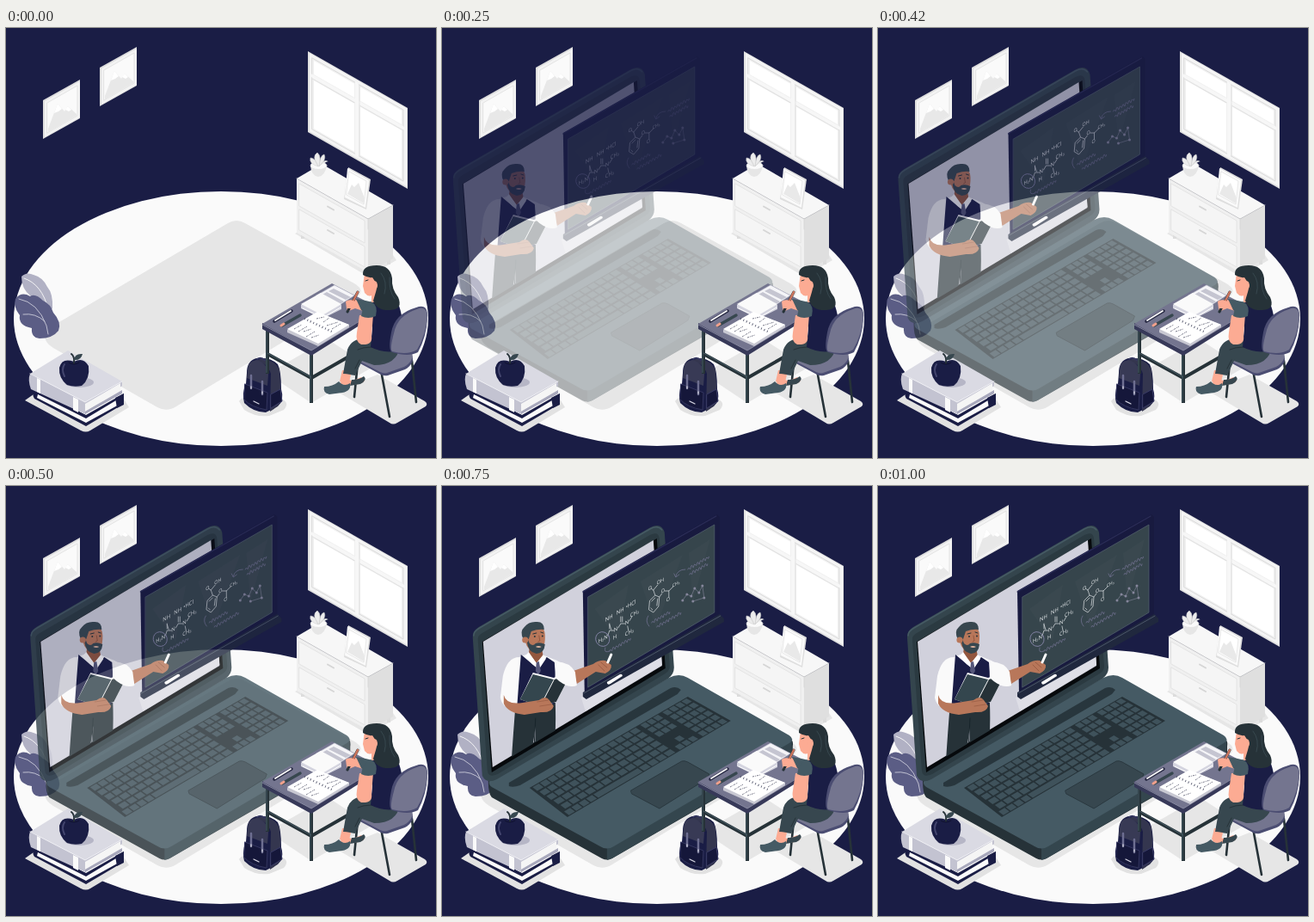
Write an HTML page that moves like this. It is 500x500 px and loops after 1.04 s.

```html
<!DOCTYPE html>
<html lang="en">
<head>
<meta charset="utf-8">
<title>Online lesson</title>
<style>
  html, body { margin: 0; width: 100%; height: 100%; overflow: hidden; background: #1a1d45; }
  svg { display: block; width: 100%; height: 100%; }
  text { font-family: "Open Sans", Arial, sans-serif; }
</style>
</head>
<body>
<svg viewBox="0 0 500 500" fill="none" stroke-linecap="round" stroke-linejoin="round">
  <defs>
    <g id="picture">
      <path d="M43 84 86 60V105L43 129Z" fill="#dedede"/>
      <path d="M45 85 86 62V104L45 127Z" fill="#f3f3f3"/>
      <path d="M48 87 83 67V102L48 122Z" fill="#fafafa" stroke="#dcdcdc" stroke-width=".7"/>
      <path d="M49 117 60 88 68 97 72 91 82 100V102L49 121Z" fill="#e8e8e8"/>
      <path d="M56 99 60 88 65 94 61 97ZM69 95 72 91 76 95 73 97Z" fill="#fff"/>
    </g>
    <clipPath id="screenClip"><path d="M46 181 244 63 254 210 57 328Z"/></clipPath>
  </defs>

  <rect width="500" height="500" fill="#1a1d45"/>
  <ellipse cx="250" cy="338" rx="241" ry="148" fill="#fafafa"/>
  <path d="M258 227Q268 221 278 227L405 297Q420 306 405 315L198 440Q187 447 176 441L55 372Q36 360 55 346Z" fill="#e6e6e6"/>
  <path d="M384 422 446 459Q450 462 455 459L488 440Q491 437 487 434L432 403Z" fill="#e6e6e6"/>
  <path d="M304 402 355 436 425 395 374 362Z" fill="#e6e6e6"/>
  <use href="#picture"/>
  <use href="#picture" x="66" y="-38"/>

  <g id="window" transform="matrix(1 .569 0 1 351 27)">
    <path d="M0 0H116V94H0Z" fill="#e0e0e0"/>
    <path d="M2 1H115V92H2Z" fill="#f5f5f5"/>
    <path d="M5 5H111V88H5Z" fill="#f0f0f0" stroke="#d5d5d5" stroke-width=".7"/>
    <path d="M7 7H54V23H7ZM61 7H109V23H61ZM7 30H54V86H7ZM61 30H109V86H61Z" fill="#fff"/>
    <path d="M5 26H54M61 26H111M57 5V88" stroke="#f7f7f7" stroke-width="4"/>
    <path d="M5 29H54M61 29H111M60 5V88" stroke="#dedede" stroke-width=".8"/>
  </g>

  <g id="dresser">
    <path d="M336 239 342 236 421 280 450 264 454 270 421 289Z" fill="#e6e6e6"/>
    <path d="M343 238V245H347V240M417 280V288H421M443 268V275H447V266" fill="#dcdcdc"/>
    <path d="M338 175 367 158 450 206 421 222Z" fill="#f7f7f7"/>
    <path d="M338 175 421 222V284L338 238Z" fill="#f0f0f0"/>
    <path d="M421 222 450 206V268L421 284Z" fill="#dfdfdf"/>
    <path d="M341 181 417 224V250L341 207ZM341 211 417 254V278L341 235Z" fill="#f5f5f5" stroke="#e0e0e0" stroke-width=".8"/>
    <path d="M338 175 421 222 450 206M421 222V234" stroke="#d2d2d2" stroke-width=".7"/>
    <path d="M374 207.500 381 211.500M374 235 381 239" stroke="#d6d6d6" stroke-width="2"/>
    <path d="M354 160Q355 172 363 173 371 172 373 160Z" fill="#e6e6e6"/>
    <ellipse cx="363.500" cy="160" rx="9.500" ry="4.500" fill="#fafafa" stroke="#ddd" stroke-width=".6"/>
    <path d="M363 161Q352 158 354 151 360 151 363 161 355 149 362 145 367 149 364 161 365 148 370 147 373 153 364 161 370 152 374 155 372 161Z" fill="#ededed" stroke="#d2d2d2" stroke-width=".6"/>
    <path d="M398 162 424 176 419 211 393 199Z" fill="#dedede"/>
    <path d="M397 163 422 177 418 209 394 197Z" fill="#fafafa"/>
    <path d="M399 167 419 178 416 205 396 194Z" fill="#fff" stroke="#d8d8d8" stroke-width=".6"/>
    <path d="M397 193 402 182 405 185 410 180 417 198 416 204Z" fill="#e9e9e9"/>
  </g>

  <g id="leaves">
    <path d="M18 289Q24 283 32 287 43 290 48 301 55 309 54 326L45 337Q39 320 28 311 18 303 18 289Z" fill="#b1b1c4"/>
    <path d="M21 291Q42 298 49 327" stroke="#fafafa" stroke-width=".9"/>
    <path d="M11 315Q18 306 28 312 34 308 43 317 52 321 55 331 65 342 61 352 54 361 39 361 29 360 30 349 14 346 16 334 8 324 11 315Z" fill="#5b5d85"/>
    <path d="M15 315Q37 319 47 346L49 356M20 333Q34 331 45 341" stroke="#d8d8e4" stroke-width=".8"/>
  </g>

  <g id="laptop">
    <path d="M52 343 275 222 404 294Q407 297 406 303L406 312 196 433Q190 436 184 433L56 362Q52 358 52 343Z" fill="#263238"/>
    <path d="M190 421 405 296V311L196 433 190 435Z" fill="#34464e"/>
    <path d="M54 342 262 223Q274 217 284 223L402 290Q409 295 402 299L198 419Q190 424 182 419L56 350Q51 346 54 342Z" fill="#455a64"/>
    <path d="M34 177Q33 169 41 164L239 49Q253 41 257 54L268 211Q268 219 261 224L62 341Q50 347 45 337Z" fill="#34454d"/>
    <path d="M40 180Q39 174 45 171L240 57Q250 52 251 61L263 209Q263 215 258 218L63 335Q52 340 51 331Z" fill="#2b3a41"/>
    <path d="M35 174Q35 169 42 165L240 50Q249 45 254 51" stroke="#455a64" stroke-width="1.500"/>
    <path d="M45 181 248 61 258 212 56 333Z" fill="#06090c"/>
    <path d="M46 181 244 63 254 209 57 327Z" fill="#d1d1dc"/>
    <path d="M160 246 253 192 254 208 165 262Z" fill="#dedee6"/>

    <g id="teacher">
      <g clip-path="url(#screenClip)">
        <path d="M84 251 130 252Q131 279 129 308L106 318 107 279 102 315 78 335Q81 287 84 251Z" fill="#263238"/>
        <path d="M107 270 105 310" stroke="#17242a"/>
      </g>
      <path d="M88 199Q74 199 69 221L66 246Q69 260 82 258L92 246 94 210Z" fill="#fafafa"/>
      <path d="M88 199 101 194 117 197 132 203 152 215 154 232Q143 235 130 225L128 253 86 256Z" fill="#f7f7f9"/>
      <path d="M90 196 109 212 120 199 129 205Q131 227 129 253L85 263 88 222Z" fill="#1a1d45"/>
      <path d="M100 187 99 195 109 207 116 198 114 188Z" fill="#93573f"/>
      <path d="M99 193 108 206 116 196 119 201 111 213 103 207 95 198Z" fill="#fff"/>
      <path d="M108 205 111 204 113 215 110 220 107 215Z" fill="#55577a"/>
      <path d="M96 168Q98 161 109 162 119 163 118 178 117 194 107 194 98 192 95 181Z" fill="#b8775a"/>
      <path d="M93 179Q88 169 94 164 99 157 109 158 117 158 117 167 110 166 102 169L99 178Z" fill="#37474f"/>
      <path d="M98 178 100 183Q104 187 107 183 112 181 118 184 117 195 108 195 98 193 97 181Z" fill="#37474f"/>
      <circle cx="95" cy="179" r="3.600" fill="#b8775a"/>
      <path d="M107 187Q110 185 114 187 111 189 107 187Z" fill="#e3b5a0"/>
      <path d="M104 172 108 171M113 170 116 171" stroke="#263238"/>
      <path d="M111 174 112 180 110 181" stroke="#8b4f38" stroke-width=".8"/>
      <circle cx="106" cy="175" r="1" fill="#263238"/><circle cx="115" cy="174.500" r="1" fill="#263238"/>
      <path d="M104 217 128 223 147 216 148 219 131 251 113 256 89 248Z" fill="#fafafa"/>
      <path d="M104 219 128 225 112 256 89 248Z" fill="#34464e"/>
      <path d="M129 225 148 218 131 251 113 256Z" fill="#263238"/>
      <path d="M70 243Q73 255 92 252L111 249Q119 243 123 249L128 256Q126 264 113 263L94 266Q75 264 70 253Z" fill="#b8775a"/>
      <path d="M109 251 122 249M112 256 125 254" stroke="#93573f" stroke-width=".6"/>
    </g>

    <g id="board">
      <path d="M162 122 318 33 321 36V151L164 243Z" fill="#181a3f"/>
      <path d="M162 123 317 35" stroke="#2b2d58" stroke-width="1.200"/>
      <path d="M168 129 315 45V147L168 234Z" fill="#36454c" stroke="#505d6a" stroke-width=".8"/>
      <path d="M176 143 215 115 203 181ZM229 111 278 80 247 165ZM285 78 310 62 290 135Z" fill="#3d4c53" opacity=".6"/>
      <path d="M162 240 321 149 326 154V158L166 248 162 245Z" fill="#20283e"/>
      <path d="M163 241 322 151" stroke="#4b5669"/>
      <path d="M190 228 205 219Q208 218 208 221L194 230Q190 232 190 228Z" fill="#fafafa"/>
      <g id="chalk"></g>
    </g>
    <path d="M151 215 174 207Q181 202 188 203L195 208Q196 214 188 218L177 216 155 230Z" fill="#b8775a"/>
    <path d="M131 204Q147 205 153 216L155 232Q143 236 130 223Z" fill="#fafafa"/>
    <path d="M183 205 190 211M180 208 187 215" stroke="#93573f" stroke-width=".8"/>
    <path d="M191 205 195 196" stroke="#fff" stroke-width="3"/>
    <path d="M76 345 264 235Q271 232 276 237L272 242 89 348Q81 351 76 349Z" fill="#28363d"/>
    <path id="keyBed" fill="#263238"/>
    <path id="keys" fill="#3f525b"/>
    <path d="M218 354 277 320Q280 319 284 321L309 335 307 340 251 375 219 358Z" fill="#37474f" stroke="#2a383f"/>
  </g>

  <g id="books">
    <path d="M22 433 32 426 94 458 136 430 143 441 98 468Q93 471 87 468Z" fill="#e2e2e2"/>
    <path d="M35 423 93 450 137 425V437L93 463 33 431Q29 425 35 423Z" fill="#1a1d45"/>
    <path d="M37 426 93 454 133 430V437L93 459 36 430Z" fill="#fafafa"/>
    <path d="M127 430 137 425V438L129 442Z" fill="#1a1d45"/>
    <path d="M28 402 92 435 135 411V416L92 449 29 420Q25 409 28 402Z" fill="#c3c3d1"/>
    <path d="M92 437 133 413V422L92 446Z" fill="#f5f5f5"/>
    <path d="M92 446 135 421V425L92 449Z" fill="#a8a8bc"/>
    <path d="M28 402 72 375 135 411 92 435Z" fill="#dadae3"/>
    <path d="M28 402 92 435 135 411" stroke="#eeeef3"/>
    <path d="M36 407 40 409V425L36 423ZM78 429 84 432V447L78 444Z" fill="#fafafa"/>
    <ellipse cx="85" cy="412" rx="17" ry="6" fill="#b6b6c6"/>
    <path d="M79 388Q90 382 96 393 98 408 88 416 79 418 71 415 61 407 62 395 65 383 79 388Z" fill="#1a1d45"/>
    <path d="M68 391Q64 397 68 405" stroke="#44466f" stroke-width="2"/>
    <path d="M79 390Q80 382 76 379" stroke="#263238" stroke-width="2"/>
    <path d="M79 386Q80 378 89 379 87 387 79 386Z" fill="#37474f"/>
    <path d="M73 389Q79 393 85 389" stroke="#0f1130"/>
  </g>

  <g id="bag">
    <path d="M271 434Q277 425 292 430L319 431Q331 435 323 444L306 451Q291 453 277 444Z" fill="#e2e2e2"/>
    <path d="M280 401Q280 387 291 384 307 382 316 391 320 399 320 420 324 433 316 440L302 447Q288 447 277 436 274 424 279 414Z" fill="#1a1d45"/>
    <path d="M290 387Q304 389 308 402L307 446Q317 440 320 434L318 397Q313 387 299 384Z" fill="#34364f"/>
    <path d="M281 398Q281 387 291 386 304 389 305 403L304 416 280 407Z" fill="#383a55"/>
    <path d="M278 414 304 424 303 444Q285 441 277 432Z" fill="#15173a" stroke="#34365f"/>
    <path d="M308 426 319 420 321 434 308 442Z" fill="#15173a" stroke="#393b66"/>
    <path d="M285 404V419M298 411V426" stroke="#6d6e91" stroke-width="2.500"/>
    <path d="M285 417V419M298 423V425M288 434 294 437" stroke="#d2d2df" stroke-width="1.300"/>
    <path d="M292 385Q296 382 301 386" stroke="#353760" stroke-width="2"/>
  </g>

  <g id="desk">
    <path d="M304 351V402M355 379V436M304 379 355 407M355 407 397 383" stroke="#263238" stroke-width="4" stroke-linecap="butt"/>
    <path d="M303 351V401M354 379V435M304 378 355 406" stroke="#455a64" stroke-linecap="butt"/>
    <path d="M298 343 354 372 422 332V339L355 381 298 350Z" fill="#373959"/>
    <path d="M298 344 379 297 423 320 422 334 355 375Z" fill="#74758f"/>
    <path d="M298 345 355 375 421 335" stroke="#9697ad" stroke-width=".8"/>
    <path d="M361 311 382 299 405 311 383 325Z" fill="#f5f5f8" stroke="#c8c8d5" stroke-width=".6"/>
    <path d="M366 311 373 307 393 318 387 322ZM375 306 381 303 401 313 395 316Z" fill="#c5c5d1"/>
    <path d="M343 322 366 309 390 322V327L368 338 343 326Z" fill="#d4d4df"/>
    <path d="M343 321 366 308 390 321 368 334Z" fill="#fafafa"/>
    <path d="M345 326 368 337 389 325" stroke="#fff"/>
    <path d="M327 351 362 331 399 345V348L363 370 327 354Z" fill="#c8c8d2"/>
    <path d="M327 350 362 330 399 345 363 367Z" fill="#fff"/>
    <path d="M347 338 381 354" stroke="#4c4e65" stroke-width="2.500" stroke-dasharray=".8 3" stroke-linecap="butt"/>
    <path d="M335 350 344 345M340 353 350 347M346 353 355 350M349 359 359 353M355 360 364 357M361 338 370 336M369 342 376 337M373 346 386 342M379 350 389 344" stroke="#777888" stroke-dasharray="2 1 1 1" stroke-linecap="butt"/>
    <path d="M312 341 332 329" stroke="#262842" stroke-width="3.500"/>
    <path d="M313 340 331 329" stroke="#fafafa" stroke-width="1.800"/>
    <path d="M321 346 342 334" stroke="#37474f" stroke-width="3.500"/>
    <path d="M320 346 323 344" stroke="#f0a08c" stroke-width="3"/>
  </g>

  <g id="student">
    <path d="M409 389 405 429M472 387 477 435M436 398 446 452" stroke="#263238" stroke-width="2.600"/>
    <path d="M406 381 428 370 472 380Q476 390 464 397L444 404Q440 405 436 403L408 388Z" fill="#4b4d72"/>
    <path d="M406 379 428 368 472 377Q475 387 463 394L443 401Q439 402 435 400L408 386Z" fill="#74758f"/>
    <path d="M391 398 400 398 397 409 404 410 413 406 417 410Q414 415 399 415L388 411Z" fill="#fcab93"/>
    <path d="M402 409Q411 409 416 405 421 409 412 414L400 416Z" fill="#37474f"/>
    <path d="M397 374Q402 360 420 361L458 370Q455 392 428 392L414 387 406 404 392 402Z" fill="#37474f"/>
    <path d="M409 374Q422 368 445 374M411 386 406 396" stroke="#263238"/>
    <path d="M391 402 401 403 398 416 389 414Z" fill="#fcab93"/>
    <path d="M370 417Q380 417 387 411 393 418 400 413 402 422 391 424L376 426Q368 424 370 417Z" fill="#455a64"/>
    <path d="M397 319 404 315 420 322 418 330 406 326 396 330Z" fill="#fcab93"/>
    <path d="M407 315 418 317 427 319 423 335 413 328Z" fill="#455a64"/>
    <path d="M426 318Q442 317 457 323 464 343 461 374 441 380 424 371L426 348 419 333Z" fill="#1a1d45"/>
    <path d="M411 334 427 333 425 358Q427 369 413 368 406 365 408 354Z" fill="#fcab93"/>
    <path d="M413 335Q414 323 425 318 433 323 430 335 421 339 413 335Z" fill="#455a64"/>
    <path d="M417 285 415 300 417 308Q421 313 425 311L425 319 434 319 434 290Z" fill="#fcab93"/>
    <path d="M415 287Q414 276 431 276 447 276 449 291 448 303 456 313 462 327 447 328 431 329 427 317L430 307 432 299 426 290Q421 291 415 287Z" fill="#263238"/>
    <path d="M436 285Q444 295 440 309M446 290Q445 306 452 315" stroke="#3b4d55" stroke-width=".8"/>
    <ellipse cx="428.500" cy="299" rx="3.300" ry="4.800" fill="#fcab93"/>
    <path d="M418 294 421 293" stroke="#263238"/>
    <path d="M397 330 409 307" stroke="#263238" stroke-width="3"/>
    <path d="M404 317 409 307" stroke="#ce765f" stroke-width="2.500"/>
    <path d="M395 318Q400 314 408 319L405 326 396 326Z" fill="#fcab93"/>
    <path d="M448 354Q452 332 477 325 491 320 490 337 489 359 479 377 468 383 449 377 444 375 448 354Z" fill="#4b4d72"/>
    <path d="M451 355Q455 334 478 327 490 322 490 337 488 357 478 374 467 381 449 376 446 373 451 355Z" fill="#74758f"/>
  </g>
</svg>
<script>
const LOOP = 1040, FPS = 24, TRAVEL = 30;
const byId = id => document.getElementById(id);

// Point inside the keyboard's four corners.
function onKeyboard(u, v) {
  const top = [100 + 184 * u, 351 - 106 * u];
  const bottom = [144 + 190 * u, 385 - 112 * u];
  return top.map((a, i) => (a + (bottom[i] - a) * v).toFixed(1)).join(" ");
}
const patch = (u, v, w, h) =>
  `M${[[u, v], [u + w, v], [u + w, v + h], [u, v + h]].map(p => onKeyboard(...p)).join("L")}Z`;

function buildKeyboard() {
  const rows = 6, h = 1 / rows;
  let keys = "";
  const row = (r, start, end, count) => {
    const w = (end - start) / count;
    for (let i = 0; i < count; i++) keys += patch(start + i * w + .004, r * h + .02, w - .008, h - .04);
  };
  for (let r = 0; r < rows; r++) {
    if (r < 5) row(r, .01 + .004 * r, .67, 14 - (r > 2));
    if (r < 3) row(r, .69, .81, 3);
    row(r, .83, .99, 4);
  }
  row(4, .73, .77, 1);
  row(5, .01, .19, 4);
  row(5, .19, .47, 1);
  row(5, .47, .67, 4);
  row(5, .69, .81, 3);
  byId("keyBed").setAttribute("d", patch(0, 0, 1, 1));
  byId("keys").setAttribute("d", keys);
}

function buildChalk() {
  const label = (s, x, y, size = 6.5) =>
    `<text transform="matrix(.9 -.5 0 1 ${x} ${y})" font-size="${size}" fill="#eceff1">${s}</text>`;
  const line = (d, color = "#dfe3e6", width = .7) =>
    `<path d="${d}" stroke="${color}" stroke-width="${width}"/>`;
  const scribble = (x, y, n) => {
    let d = `M${x} ${y}`;
    for (let i = 0; i < n; i++) d += `q1 ${-3 - i % 2} 2 -1t1.500 ${i % 3 ? -.8 : -1.500}`;
    return line(d, "#777697");
  };
  const formulas = [
    ["NH", 188, 158], ["NH", 201, 150], ["•HCl", 212, 143], ["H₂N", 180, 183],
    ["N", 198, 170], ["H", 197, 179], ["N", 211, 162], ["CH₃", 217, 153], ["CH₃", 211, 175],
    ["O", 238, 122, 6], ["OH", 248, 115, 6], ["O", 253, 125, 6], ["O", 259, 135, 6], ["CH₃", 266, 118, 5.5]
  ];
  const dots = [[278, 133], [283, 126], [288, 128], [292, 119], [297, 124], [301, 116], [303, 130], [290, 134]];
  byId("chalk").innerHTML = formulas.map(f => label(...f)).join("")
    + line("M191 174 193 168 198 168M193 166V160M195 167 193 161M203 165 206 160 211 160M206 158V152M208 158V152M216 157 219 152M214 163 215 168")
    + line("M240 133 246 127 251 129 250 140 244 147 239 144ZM242 134 246 130M249 131 248 139M243 144 241 142M246 127 244 121 241 119M244 121 249 115M251 129 254 125M257 122 262 122 267 117M262 122 262 129")
    + `<ellipse cx="185" cy="178" rx="8" ry="8.500" transform="rotate(-28 185 178)" stroke="#8988ac" stroke-width=".8"/>`
    + line("M188 188Q186 195 193 192M238 151Q234 157 239 163M281 97Q272 97 270 105M268 102 270 106 274 103", "#777697")
    + scribble(193, 192, 7) + scribble(242, 159, 6) + scribble(248, 164, 8)
    + scribble(284, 97, 7) + scribble(286, 103, 6)
    + line("M" + dots.map(p => p.join(" ")).join("L"), "#85869b", .6)
    + dots.map(([x, y]) => `<circle cx="${x}" cy="${y}" r="1.500" fill="#85869b"/>`).join("");
}

const bezier = (a, b, s) => 3 * a * (1 - s) ** 2 * s + 3 * b * (1 - s) * s * s + s ** 3;

function ease(x) {
  let low = 0, high = 1;
  for (let i = 0; i < 24; i++) {
    const mid = (low + high) / 2;
    if (bezier(.36, .5, mid) < x) low = mid; else high = mid;
  }
  return bezier(-.01, 1.38, low);
}

const laptop = byId("laptop");

function render(ms) {
  const step = Math.floor((ms % LOOP + 5) * FPS / 1000);
  const progress = ease(Math.min(1, step / FPS + .036));
  laptop.setAttribute("transform", `translate(${(TRAVEL * (progress - 1)).toFixed(2)} 0)`);
  laptop.setAttribute("opacity", step < 2 ? 0 : Math.min(1, progress));
}

buildKeyboard();
buildChalk();
const start = performance.now();
function tick() {
  render(performance.now() - start);
  requestAnimationFrame(tick);
}
tick();
</script>
</body>
</html>
```
